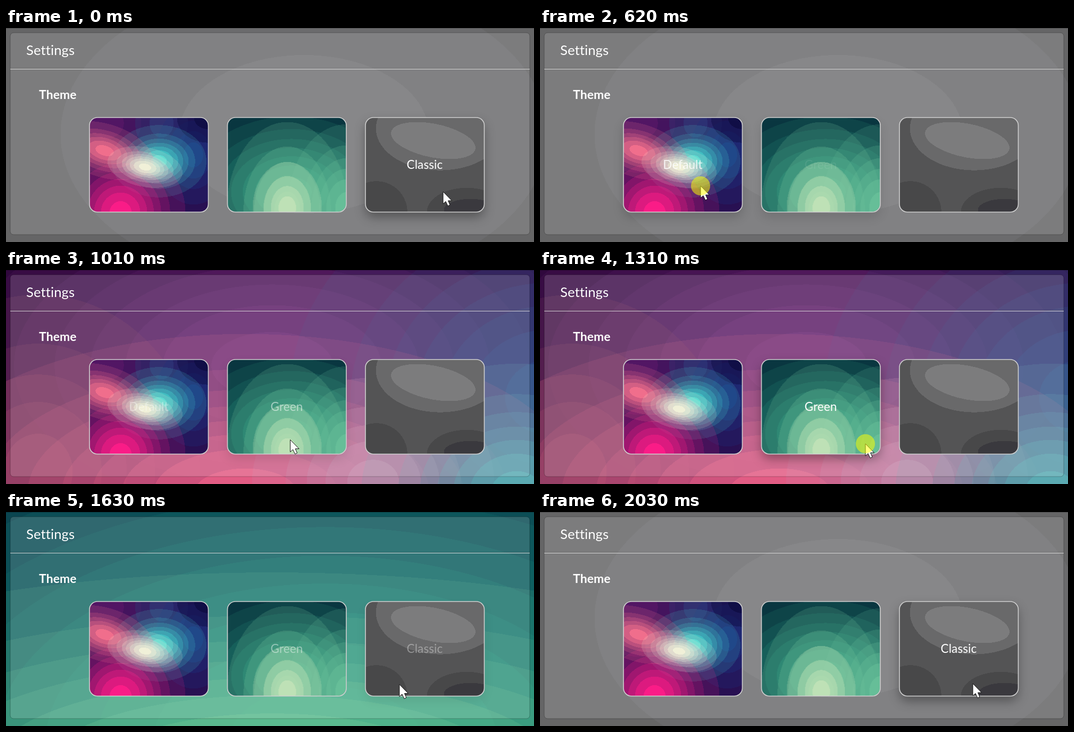
An HTML page with a canvas that plays this animation: 993 by 404 pixels, repeating every 2.26 s.

```html
<!DOCTYPE html>
<html lang="en">
<head>
<meta charset="utf-8">
<title>Theme settings</title>
<style>
html, body { margin: 0; width: 100%; height: 100%; overflow: hidden; background: #666; }
canvas { display: block; }
</style>
</head>
<body>
<canvas id="stage" width="993" height="404"></canvas>
<script>
const start = performance.now();
const c = document.getElementById('stage').getContext('2d');
const LOOP = 2260, W = 993, H = 404, TILE_W = 223, TILE_H = 178, TILE_Y = 169;

const mix = (a, b, p) => a + (b - a) * p;
const white = a => `rgba(255,255,255,${a})`;
const black = a => `rgba(0,0,0,${a})`;
const channels = hex => [1, 3, 5].map(i => parseInt(hex.slice(i, i + 2), 16));

// A soft spot of colour that falls off in even bands
const spot = (x, y, rx, ry, color, bands = 7, turn = 0) =>
  ({ x, y, rx, ry, color: channels(color), bands, cos: Math.cos(turn), sin: Math.sin(turn) });

// Lays banded spots over a base colour
function paint(w, h, base, ...spots) {
  const image = new ImageData(w, h);
  const ground = channels(base);
  for (let i = 0; i < w * h; i++) {
    const px = i % w, py = Math.floor(i / w);
    let [r, g, b] = ground;
    for (const s of spots) {
      const dx = px - s.x, dy = py - s.y;
      const u = (dx * s.cos + dy * s.sin) / s.rx;
      const v = (dy * s.cos - dx * s.sin) / s.ry;
      const p = Math.round(Math.exp(-u * u - v * v) * s.bands) / s.bands;
      r = mix(r, s.color[0], p);
      g = mix(g, s.color[1], p);
      b = mix(b, s.color[2], p);
    }
    image.data.set([r, g, b, 255], i * 4);
  }
  const canvas = document.createElement('canvas');
  canvas.width = w;
  canvas.height = h;
  canvas.getContext('2d').putImageData(image, 0, 0);
  return canvas;
}

const themes = [
  {
    name: 'Default', x: 157,
    page: paint(W, H, '#280436',
      spot(500, 180, 450, 250, '#662470', 8),
      spot(1020, 240, 300, 260, '#304682'),
      spot(60, 380, 200, 220, '#7d375c', 5),
      spot(450, 420, 380, 180, '#e25c84', 8),
      spot(690, 400, 150, 130, '#c382a5', 5),
      spot(960, 420, 180, 150, '#5baab2')),
    art: paint(TILE_W, TILE_H, '#281052',
      spot(30, 10, 80, 70, '#521664', 3),
      spot(135, 10, 42, 50, '#323070', 2),
      spot(195, 70, 50, 65, '#1a307d', 4),
      spot(223, 0, 50, 40, '#100e46', 2),
      spot(130, 82, 55, 42, '#46d7d0'),
      spot(58, 178, 75, 75, '#fa1c87'),
      spot(28, 62, 60, 32, '#f06e8c', 6, .3),
      spot(104, 93, 44, 23, '#f0f0d8', 7, .2))
  },
  {
    name: 'Green', x: 416.5,
    page: paint(W, H, '#083446',
      spot(600, 430, 800, 450, '#148a7a', 10),
      spot(500, 480, 700, 220, '#64c091', 8)),
    art: paint(TILE_W, TILE_H, '#052837',
      spot(120, 140, 150, 110, '#28967d', 8),
      spot(223, 170, 70, 100, '#64be98', 6),
      spot(112, 175, 75, 110, '#6ec098', 5),
      spot(112, 170, 45, 60, '#bee1b6', 4))
  },
  {
    name: 'Classic', x: 676, keepsShadow: true,
    page: paint(W, H, '#5e5e5f', spot(560, 200, 550, 350, '#727274', 3)),
    art: paint(TILE_W, TILE_H, '#545455',
      spot(140, 20, 145, 95, '#69696a', 1),
      spot(127, 43, 97, 38, '#7c7c7d', 1, .2),
      spot(20, 178, 70, 70, '#484849', 1),
      spot(190, 178, 90, 55, '#484849', 1),
      spot(197, 174, 60, 25, '#3a393e', 1))
  }
];

// Pointer stops: time, x, y
const stops = [
  [70, 822, 309], [540, 302, 298], [700, 302, 298], [1160, 612, 328],
  [1390, 612, 328], [1780, 814, 324], [LOOP, 814, 324]
];
const clicks = [
  { down: 620, up: 700, theme: themes[0] },
  { down: 1310, up: 1390, theme: themes[1] },
  { down: 1860, up: 1950, theme: themes[2] }
];
// Spans with evenly spaced picture changes: first, last, count
const bursts = [[150, 620, 7], [700, 1160, 7], [1310, 1780, 7], [1860, 2030, 3]];

function snap(t) {
  let time = 0;
  for (const [first, last, count] of bursts) {
    for (let i = 0; i < count; i++) {
      const tick = Math.round(mix(first, last, i / (count - 1)) / 10) * 10;
      if (tick <= t) time = tick;
    }
  }
  return time;
}

function pointerAt(t) {
  const i = stops.findIndex(([time]) => t < time);
  if (i === 0) return stops[0].slice(1);
  const [t0, x0, y0] = stops[i - 1], [t1, x1, y1] = stops[i];
  const p = (t - t0) / (t1 - t0), e = p * p * (3 - 2 * p);
  return [mix(x0, x1, e), mix(y0, y1, e)];
}

// Share of the last span of time that the pointer spent on a tile
function hover(t, tile, span) {
  const samples = 25;
  let inside = 0;
  for (let i = 0; i < samples; i++) {
    const [x] = pointerAt((t - span * i / samples + LOOP) % LOOP);
    if (x > tile.x && x < tile.x + TILE_W) inside++;
  }
  return inside / samples;
}

function box(x, y, w, h, radius) {
  c.beginPath();
  c.roundRect(x, y, w, h, radius);
}

function bar(color, x, y, w) {
  c.fillStyle = color;
  c.fillRect(x, y, w, 1);
}

function text(str, x, y, font, align = 'left', alpha = 1) {
  c.font = `${font} Lato, "Open Sans", sans-serif`;
  c.letterSpacing = '0.1px'; // also turns ligatures off
  c.textAlign = align;
  c.fillStyle = white(alpha);
  c.fillText(str, x, y);
}

function drawPanel() {
  box(8, 9, 977, 381, 6);
  c.fillStyle = white(.15);
  c.fill();
  c.strokeStyle = black(.25);
  c.lineWidth = 1;
  c.stroke();
  bar(black(.25), 0, 0, W);
  bar(black(.2), 8, 76, 977);
  bar(white(.8), 8, 77, 977);
  text('Settings', 38, 51, '25.6px');
  text('Theme', 62, 134, 'bold 22.9px');
}

function drawTile(tile, label, shadow) {
  c.save();
  box(tile.x, TILE_Y, TILE_W, TILE_H, 15);
  c.shadowColor = black(shadow);
  c.shadowBlur = 20;
  c.shadowOffsetY = 10;
  c.fillStyle = '#444';
  c.fill();
  c.shadowColor = 'transparent';
  c.clip();
  c.drawImage(tile.art, tile.x, TILE_Y);
  c.restore();

  box(tile.x, TILE_Y, TILE_W + .5, TILE_H + .5, 15);
  c.strokeStyle = '#cfcfcf';
  c.lineWidth = 1.6;
  c.stroke();
  text(tile.name, tile.x + TILE_W / 2, 266, '22.5px', 'center', label);
}

function drawPointer(x, y, pressed) {
  c.save();
  c.translate(x, y);
  c.fillStyle = '#fff';
  c.strokeStyle = '#111';
  c.lineWidth = 1;
  const arrow = new Path2D('M0 0V23L5 18.5L9 27L13 25L9.5 17H16.5Z');
  c.fill(arrow);
  c.stroke(arrow);
  if (pressed) {
    c.fillStyle = 'rgba(255,255,0,.52)';
    c.beginPath();
    c.arc(0, 0, 18, 0, 7);
    c.fill();
  }
  c.restore();
}

function draw(t) {
  const chosen = (clicks.findLast(k => k.up <= t) || clicks[2]).theme;
  c.drawImage(chosen.page, 0, 0);
  drawPanel();
  for (const tile of themes) {
    const lifted = tile !== chosen || tile.keepsShadow;
    drawTile(tile, hover(t, tile, 250), lifted ? .35 * hover(t, tile, 400) : 0);
  }
  drawPointer(...pointerAt(t), clicks.some(k => k.down <= t && t < k.up));
}

function frame() {
  draw(snap((performance.now() - start) % LOOP));
  requestAnimationFrame(frame);
}
frame();
</script>
</body>
</html>
```
